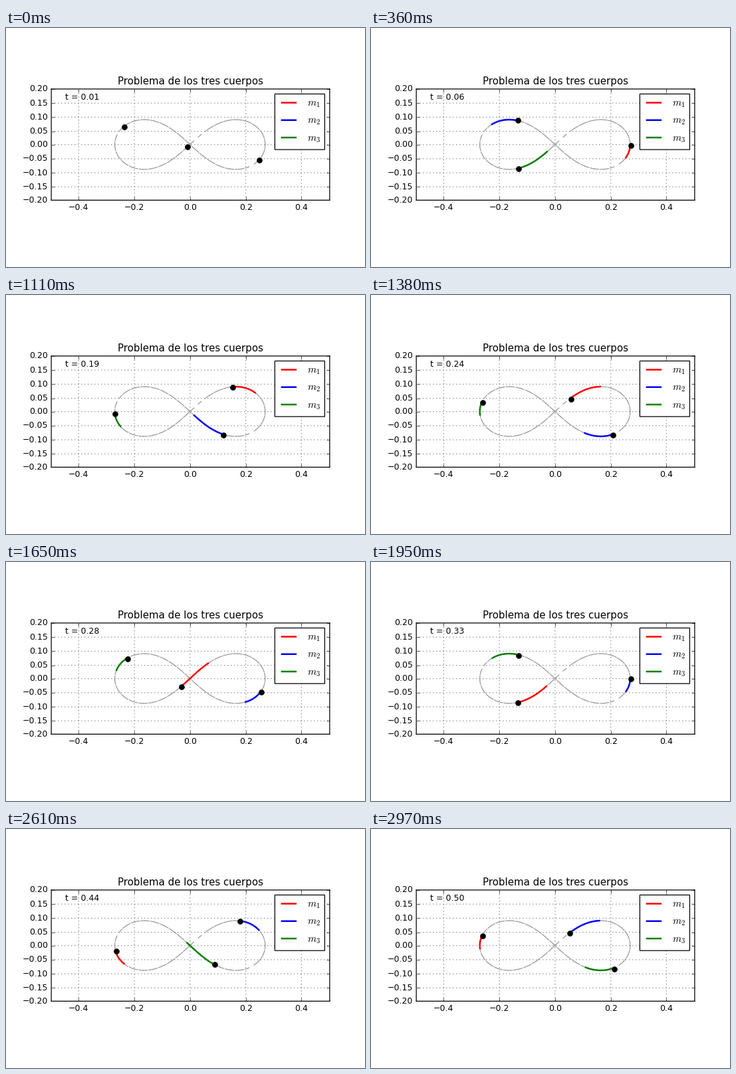
Write a matplotlib script that moves like this. It is 540 px wide and 360 px high and loops after 3000 ms.

```python
import numpy as np
import matplotlib.pyplot as plt
from matplotlib.animation import FuncAnimation
from matplotlib.patches import Rectangle
from matplotlib.transforms import Affine2D

plt.style.use("classic")
plt.rcParams.update({
    "font.family": "DejaVu Sans",
    "font.size": 10,
    "figure.facecolor": "white",
    "savefig.dpi": "figure",
    "path.snap": False,
})

WIDTH, HEIGHT = 540, 360
FRAMES, INTERVAL = 100, 30
DT, SUBSTEPS, TRAIL = 0.005, 20, 10
COLORS = "rbg"
# Pixels per data unit, pixel position of the data origin, size of a point
SCALE, CX, CY, PT = 418.5, 276.75, 175.5, 1.25


def accel(pos):
    """Gravity between three unit masses, G = 1."""
    d = pos[None, :, :] - pos[:, None, :]
    r2 = (d ** 2).sum(axis=2) + np.eye(3)
    return (d / r2[..., None] ** 1.5).sum(axis=1)


def deriv(s):
    return np.array([s[1], accel(s[0])])


def rk4(s, h):
    a = deriv(s)
    b = deriv(s + h / 2 * a)
    c = deriv(s + h / 2 * b)
    d = deriv(s + h * c)
    return s + h / 6 * (a + 2 * b + 2 * c + d)


def solve():
    """Figure-eight orbit, shrunk to a quarter of its usual size."""
    p = np.array([0.97000436, -0.24308753])
    v = np.array([0.93240737, 0.86473146])
    s = np.array([0.25 * np.array([p, -p, 0 * p]),
                  2 * np.array([v / 2, v / 2, -v])])
    path = [s[0]]
    for _ in range(FRAMES):
        for _ in range(SUBSTEPS):
            s = rk4(s, DT / SUBSTEPS)
        path.append(s[0])
    return np.array(path)


def to_cell(px):
    """Centre of the nearest cell on a grid of whole points."""
    return (np.floor(px / PT + 0.5) + 0.5) * PT


def snap_x(x):
    return (to_cell(CX + SCALE * np.asarray(x)) - CX) / SCALE


def snap_y(y):
    return (CY - to_cell(CY - SCALE * np.asarray(y))) / SCALE


path = solve()
times = np.cumsum(np.full(FRAMES, DT))

xlim, ylim = snap_x([-0.5, 0.5]), snap_y([-0.2, 0.2])
xticks, yticks = np.arange(-2, 3) * 0.2, np.arange(-4, 5) * 0.05


def labels(ticks, digits):
    return [f"{t:.{digits}f}".replace("-", "\u2212") for t in ticks]


fig = plt.figure(figsize=(6, 4), dpi=90)
ax = fig.add_axes([(CX + SCALE * xlim[0]) / WIDTH,
                   1 - (CY - SCALE * ylim[0]) / HEIGHT,
                   SCALE * np.ptp(xlim) / WIDTH,
                   SCALE * np.ptp(ylim) / HEIGHT])
ax.set_xticks(snap_x(xticks), labels(xticks, 1))
ax.set_yticks(snap_y(yticks), labels(yticks, 2))
ax.set(xlim=xlim, ylim=ylim)
ax.grid(True, color="0.5", lw=1)
ax.set_title("Problema de los tres cuerpos", pad=5.8)

for body in range(3):
    ax.plot(*path[:, body].T, "--", color="0.6", lw=1)
trails = [ax.plot([], [], color=c, lw=2)[0] for c in COLORS]
dots, = ax.plot([], [], "ko", ms=6.4, zorder=3)
clock = ax.text(0.05, 0.905, "", transform=ax.transAxes)


def draw_legend(left, top, width, height, pitch=26.25):
    """Key in pixels, measured from its top left corner."""
    px = Affine2D().scale(1, -1).translate(left, HEIGHT - top)
    ax.add_patch(Rectangle((0, 0), width, height, fc="w", ec="k", lw=1,
                           transform=px, zorder=5))
    for i, c in enumerate(COLORS):
        y = 13.1 + i * pitch
        ax.plot([10.5, 31.5], [y, y], color=c, lw=2, transform=px,
                zorder=6, scalex=False, scaley=False)
        ax.text(48.5, y + 5, f"$m_{i + 1}$", fontsize=12,
                transform=px, zorder=6)


draw_legend(404.4, 99.4, 75, 83.75)


def update(i):
    k = i + 1
    for body, line in enumerate(trails):
        line.set_data(*path[max(1, k - TRAIL):k + 1, body].T)
    x, y = path[k].T
    dots.set_data(snap_x(x), snap_y(y))
    clock.set_text(f"t = {times[i]:.2f}")
    return [*trails, dots, clock]


anim = FuncAnimation(fig, update, frames=FRAMES, interval=INTERVAL,
                     init_func=lambda: update(0), repeat=True, repeat_delay=0)
plt.show()
```
